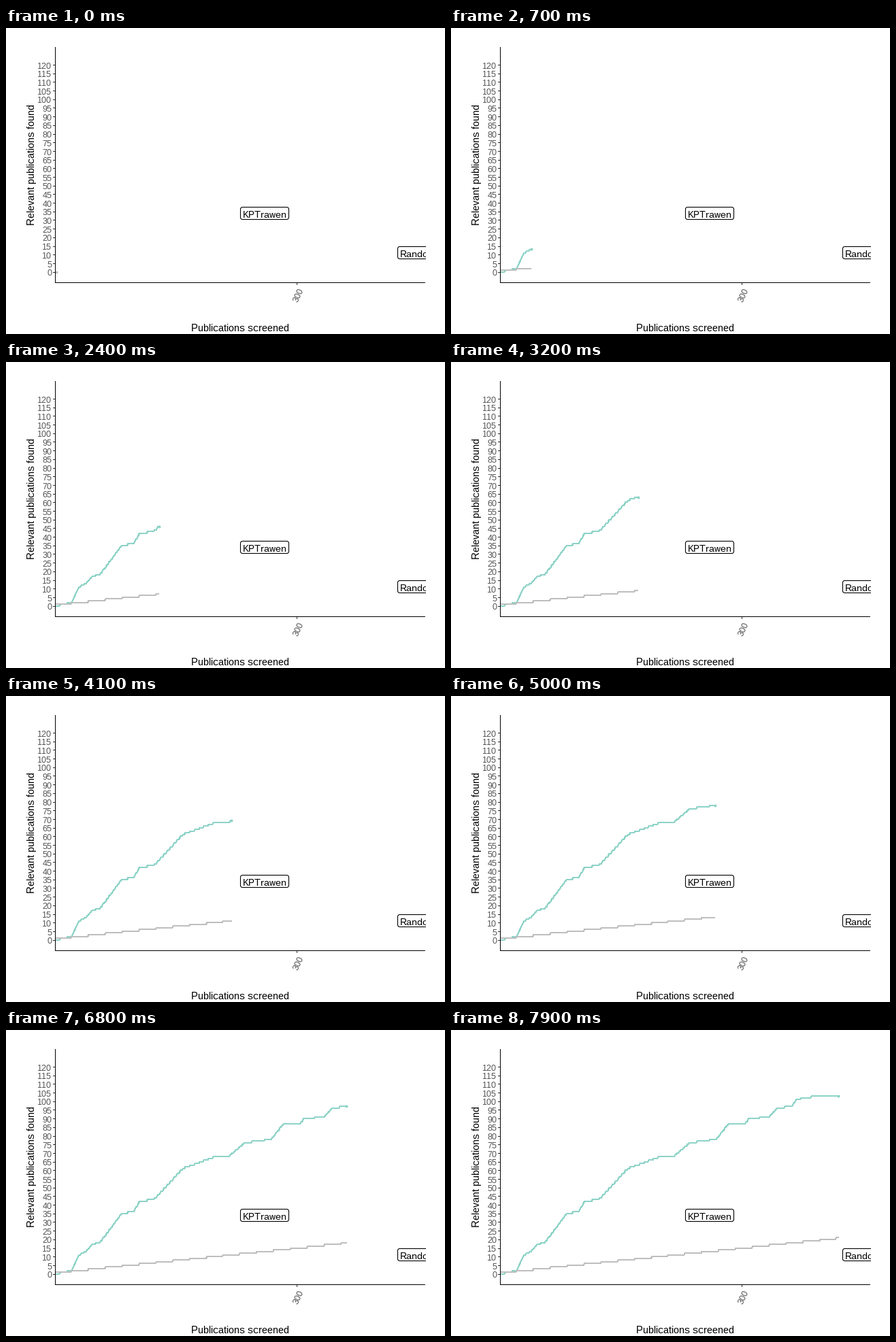
Animation, 645 px wide and 450 px high, one loop 8000 ms. Source, as a matplotlib script:

```python
import numpy as np
import matplotlib.pyplot as plt
from matplotlib.animation import FuncAnimation
from matplotlib.patches import FancyBboxPatch, Rectangle

W, H, DPI = 645, 450, 100
FRAMES, INTERVAL = 80, 100
PX = 72 / DPI  # points per pixel
TEAL, GREY = "#8dd3c7", "#bebebe"

plt.rcParams.update({
    "font.family": "Liberation Sans",
    "path.snap": False,
    "text.hinting": "native",
    "text.hinting_factor": 1,
})

# bends of the discovery curve: publications screened, relevant found
BENDS = [
    (0, 0), (20, 2), (29, 11), (38, 13), (45, 17), (55, 18), (82, 35),
    (97, 36), (104, 42), (122, 43), (158, 61), (198, 68), (215, 68),
    (235, 76), (268, 78), (283, 87), (304, 87), (308, 90), (334, 91),
    (343, 96), (362, 97), (367, 101), (391, 103),
]

# whole finds only, so both curves climb in unit steps
pubs = np.arange(430)
guided = np.round(np.interp(pubs, *zip(*BENDS)))
chance = 1 + np.floor((pubs + 1) / 20.9)


def to_x(p):
    return 72.9 + 1.183 * p


def to_y(v):
    return 358.6 - 2.538 * v


fig = plt.figure(figsize=(W / DPI, H / DPI), dpi=DPI, facecolor="white")
ax = fig.add_axes([0, 0, 1, 1])
ax.set(xlim=(0, W), ylim=(H, 0))
ax.axis("off")


def stroke(xs, ys, color, z=2):
    return ax.plot(xs, ys, color=color, lw=PX, antialiased=False,
                   solid_capstyle="butt", zorder=z)[0]


def write(x, y, s, size, color="black", **kw):
    kw = {"ha": "left", "va": "baseline", **kw}
    return ax.text(x, y, s, fontsize=size * PX, color=color, **kw)


def tag(x, y, w, h, s):
    ax.add_patch(FancyBboxPatch((x, y), w, h,
                                boxstyle="round,pad=0,rounding_size=3",
                                fc="white", ec="black", lw=1.1 * PX, zorder=5))
    write(x + 3, y + 15.4, s, 14, zorder=6)


# axes
stroke([72.5, 72.5], [28, 375], "black", z=4)
stroke([72, 616], [374.5, 374.5], "black", z=4)
for v in range(0, 121, 5):
    row = np.round(to_y(v)) + 0.5
    stroke([69, 72], [row, row], "#333333")
    write(67.3, to_y(v) + 5.6, str(v), 12, "#4d4d4d", ha="right")
stroke([427.5, 427.5], [375, 378], "#333333")
write(428.7, 392.3, "300", 12, "#4d4d4d", ha="center",
      va="center_baseline", rotation=65, rotation_mode="anchor")
write(344, 446, "Publications screened", 15, ha="center")
write(42, 201.5, "Relevant publications found", 15, ha="center",
      rotation=90, rotation_mode="anchor")

# labels, the second one cut off at the panel edge
tag(344.5, 263.5, 71, 18, "KPTrawen")
tag(575.5, 321.5, 62, 18, "Random")
ax.add_patch(Rectangle((617, 0), W - 617, H, fc="white", ec="none", zorder=8))

teal_line = stroke([], [], TEAL)
grey_line = stroke([], [], GREY, z=3)
dot = ax.plot([], [], "o", ms=4 * PX, mew=0, zorder=3)[0]


def reveal(line, values, tip):
    seen = pubs < tip
    p = np.append(pubs[seen], tip)
    v = np.append(values[seen], np.interp(tip, pubs, values))
    line.set_data(to_x(p), to_y(v))


def update(i):
    tip = 0.98 + 5.301 * i
    reveal(teal_line, guided, tip)
    reveal(grey_line, chance, tip)
    for line in (teal_line, grey_line):
        line.set_visible(i > 0)
    dot.set_data([to_x(tip)], [to_y(np.interp(tip, pubs, guided))])
    dot.set_color(TEAL if i else GREY)
    return teal_line, grey_line, dot


anim = FuncAnimation(fig, update, frames=FRAMES, interval=INTERVAL,
                     repeat=True, repeat_delay=0, blit=False)
plt.show()
```
